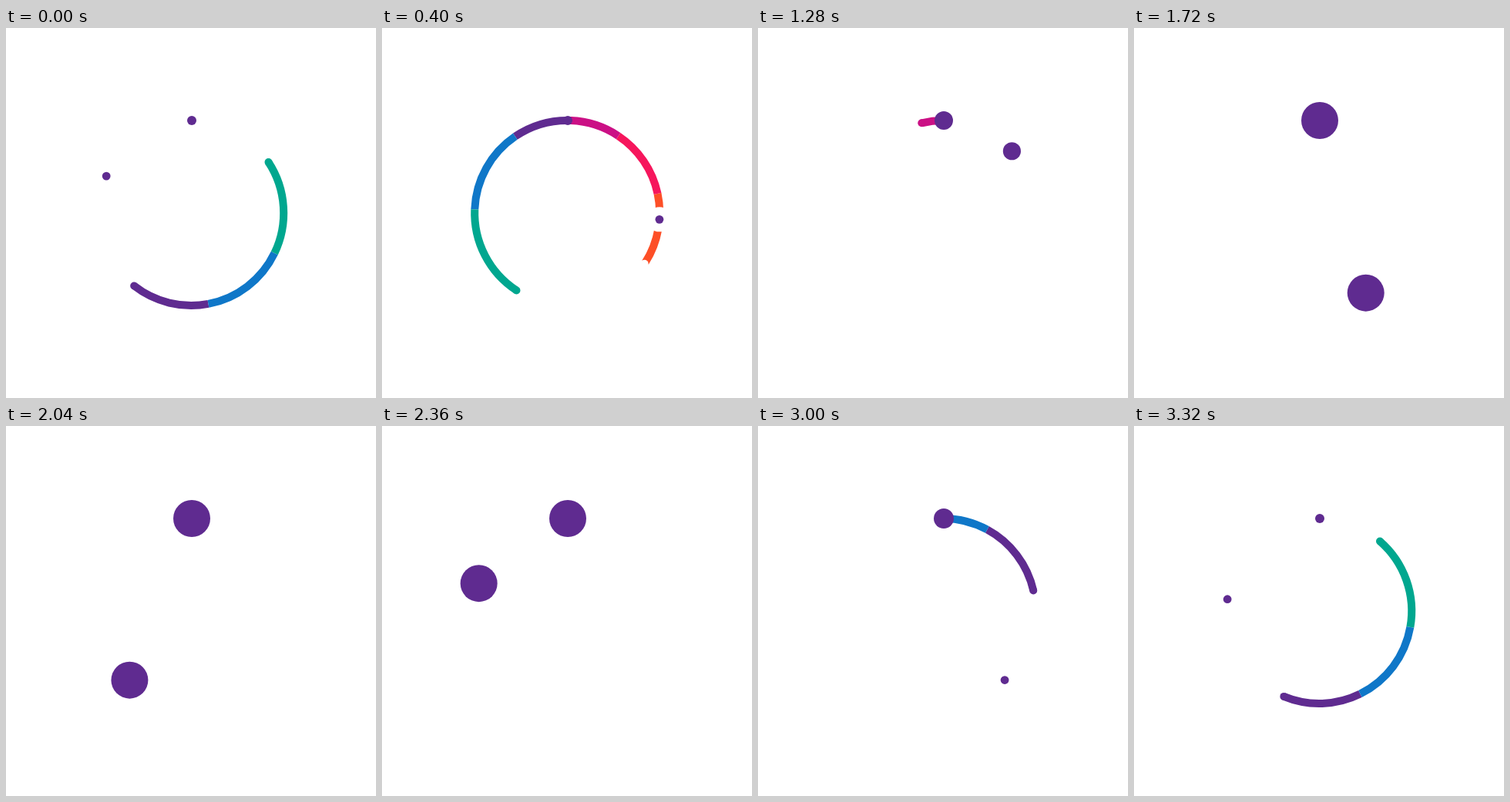
An HTML page that plays this animation: 480 px wide and 480 px high, repeating every 3360 ms.

```html
<!DOCTYPE html>
<html lang="en">
<head>
<meta charset="utf-8">
<title>Orbit loop</title>
<style>
  html, body { margin: 0; width: 100%; height: 100%; overflow: hidden; background: #fff; }
  svg { display: block; width: 100vw; height: 100vh; }
</style>
</head>
<body>
<svg id="stage" viewBox="0 0 480 480"></svg>
<script>
const LOOP = 3360, STEP = 40;
const CX = 240.2, CY = 240, RADIUS = 120, STROKE = 10;
const SPIN = 360 / 23;           // ribbon degrees per step
const LAUNCH = 2800, ARRIVE = 1065;
const PURPLE = '#5f2b90', WHITE = '#fff';

// Ribbon joints in degrees clockwise from the top at time 0, head first.
const cool = {
  joints: [218.1, 169.3, 115.7, 56.7],
  colors: [PURPLE, '#0f77c8', '#00a78f'],
  roundHead: true
};
const warm = {
  joints: [122.3, 77.9, 33.6, 2.2].map(a => a - 10 * SPIN),
  colors: ['#fd4f27', '#f6165c', '#cb1085'],
  roundHead: false
};

const stage = document.getElementById('stage');

function add(tag, attrs) {
  const el = document.createElementNS('http://www.w3.org/2000/svg', tag);
  set(el, attrs);
  stage.appendChild(el);
  return el;
}

function set(el, attrs) {
  for (const key in attrs) el.setAttribute(key, attrs[key]);
}

const clamp = (v, lo, hi) => Math.min(hi, Math.max(lo, v));
const ramp = (t, t0, t1, from, to) => from + (to - from) * clamp((t - t0) / (t1 - t0), 0, 1);

function point(deg) {
  const a = deg * Math.PI / 180;
  return [CX + RADIUS * Math.sin(a), CY - RADIUS * Math.cos(a)];
}

function arc(from, to) {
  if (to <= from) return '';
  return `M${point(from)}A${RADIUS} ${RADIUS} 0 0 1 ${point(to)}`;
}

function place(el, deg, r) {
  const [cx, cy] = point(deg);
  set(el, { cx, cy, r });
}

function buildRibbon(ribbon) {
  const { colors, roundHead } = ribbon;
  ribbon.parts = colors.map(stroke =>
    add('path', { fill: 'none', stroke, 'stroke-width': STROKE }));
  ribbon.head = add('circle', { fill: roundHead ? colors[0] : WHITE });
  ribbon.tail = add('circle', { fill: colors[colors.length - 1] });
}

// The ribbon leaves the top point at 0 degrees and vanishes there at 360.
function drawRibbon(ribbon, steps) {
  const angles = ribbon.joints.map(a => a + steps * SPIN);
  const visible = a => a > 0 && a < 360;
  ribbon.parts.forEach((part, i) => {
    part.setAttribute('d', arc(clamp(angles[i + 1], 0, 360), clamp(angles[i], 0, 360)));
  });
  const head = angles[0], tail = angles[angles.length - 1];
  const notch = ribbon.roundHead ? 0 : 0.9;
  place(ribbon.head, head + notch, visible(head) ? STROKE / 2 : 0);
  place(ribbon.tail, tail, visible(tail) ? STROKE / 2 : 0);
}

function dotAngle(t) {
  if (t >= ARRIVE && t < LAUNCH) {
    const u = (t - ARRIVE) / (LAUNCH - ARRIVE);
    return 360 * (u + (0.05 + 0.3 * u) * u * (1 - u));
  }
  const n = (t < ARRIVE ? t + LOOP - LAUNCH : t - LAUNCH) / STEP;
  return 16 * n + 70 * (1 - Math.exp(-n / 2.8));
}

const dotRadius = t => t < 2000
  ? ramp(t, 1080, 1680, 5.4, 24)
  : ramp(t, 2790, 2915, 24, 5.4);

const topRadius = t => t < 2000
  ? ramp(t, 1080, 1680, 6, 24)
  : ramp(t, 2790, 3133, 24, 6);

buildRibbon(cool);
buildRibbon(warm);
const halo = add('circle', { fill: WHITE });
const dot = add('circle', { fill: PURPLE });
const topDot = add('circle', { fill: PURPLE, cx: 241, cy: 120 });

function draw(t) {
  drawRibbon(cool, (t > 2000 ? t - LOOP : t) / STEP);
  drawRibbon(warm, (t > 2000 ? t - LOOP : t) / STEP);
  const angle = dotAngle(t);
  place(halo, angle, t < ARRIVE ? 16 : 0);
  place(dot, angle, dotRadius(t));
  topDot.setAttribute('r', topRadius(t));
}

let start;
function tick(now) {
  if (start === undefined) start = now;
  const t = Math.max(0, now - start) % LOOP;
  draw(Math.floor(t / STEP) * STEP);
  requestAnimationFrame(tick);
}

draw(0);
requestAnimationFrame(tick);
</script>
</body>
</html>
```
